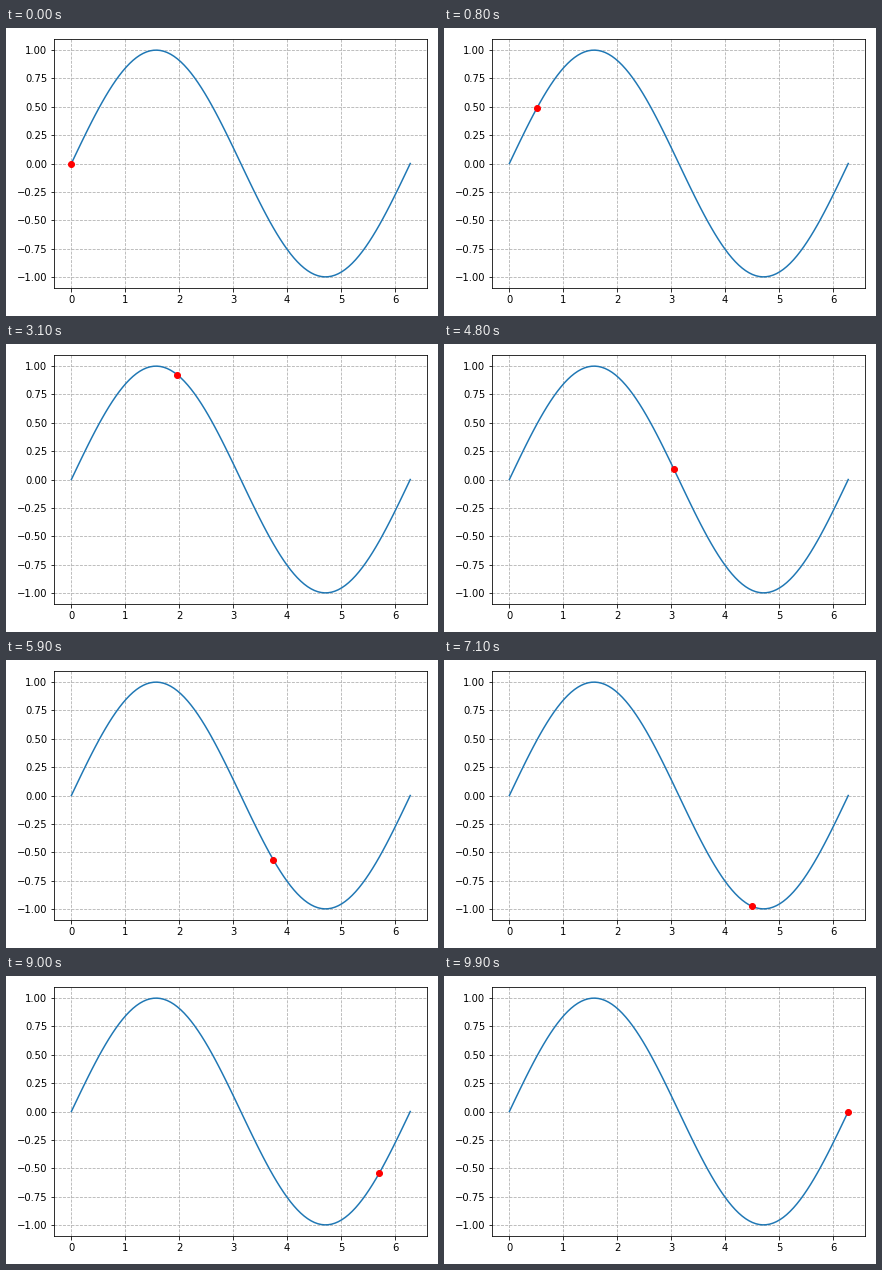
Recreate the animation shown at these times as a matplotlib script. Size 432 by 288 pixels, loop 10000 ms.

```python
import numpy as np
import matplotlib.pyplot as plt
from matplotlib.animation import FuncAnimation

FRAMES = 100
INTERVAL = 100  # ms

x = np.linspace(0, 2 * np.pi, FRAMES)
y = np.sin(x)

fig, ax = plt.subplots(figsize=(6, 4), dpi=72)
ax.plot(x, y)
dot, = ax.plot(x[:1], y[:1], "ro")
ax.grid(linestyle="--")
fig.tight_layout()


def update(i):
    dot.set_data([x[i]], [y[i]])
    return dot,


ani = FuncAnimation(fig, update, frames=FRAMES, interval=INTERVAL,
                    repeat=True, repeat_delay=0)
plt.show()
```
